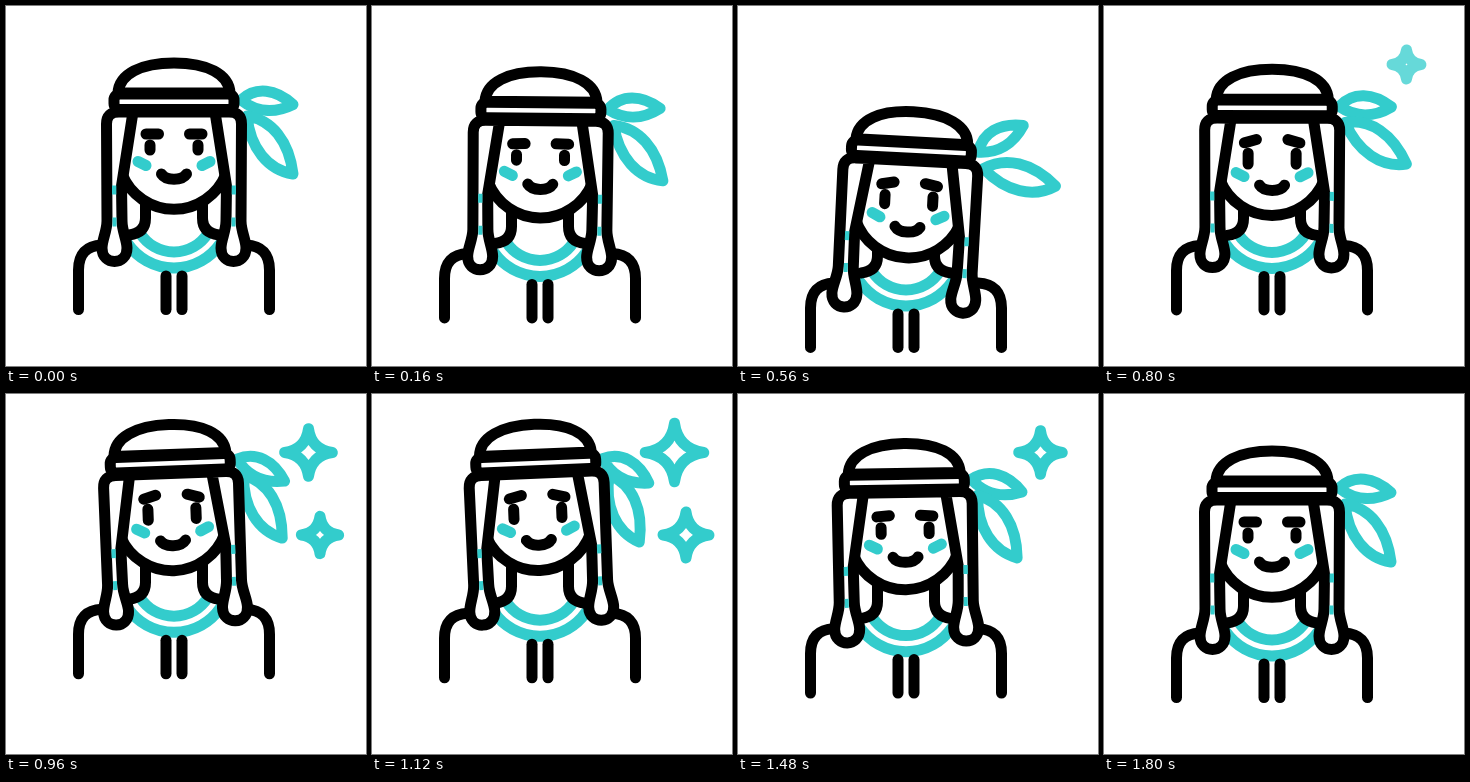
An HTML page for the animation above (2 s loop, 360x360 px).

```html
<!DOCTYPE html>
<html lang="en">
<head>
<meta charset="utf-8">
<title>Nodding character</title>
<style>
  html, body { margin: 0; width: 100%; height: 100%; overflow: hidden; background: #fff; }
  svg { display: block; width: 100vw; height: 100vh; }
  .ink, .teal { fill: none; stroke-width: 11; stroke-linecap: round; stroke-linejoin: round; }
  .ink { stroke: #000; }
  .teal { stroke: #3cc; }
  .solid { fill: #fff; }
  .tie { stroke-width: 9; stroke-linecap: butt; }
</style>
</head>
<body>
<svg viewBox="0 0 360 360">
  <defs>
    <g id="shoulder" class="ink">
      <path d="M72.5 303.5V264Q72.5 240 96 239"/>
      <path d="M139.5 190V212Q139.5 227 123 229"/>
      <path d="M160 303.5V270"/>
    </g>
    <g id="braid">
      <path class="ink solid" d="M127 106L115.5 180L116 215C116 225 121 234 121 242C121 260 96 260 96 242C96 234 101 225 101 215L100.5 118Q100.5 106 113 106Z"/>
      <path class="teal tie" d="M106 184H110.3M106.500 216H110.500"/>
    </g>
  </defs>

  <g id="body">
    <g class="teal">
      <path d="M134.6 228A40 40 0 0 0 201.4 228"/>
      <path d="M122 238A56 56 0 0 0 214 238"/>
    </g>
    <use href="#shoulder"/>
    <use href="#shoulder" transform="matrix(-1 0 0 1 336 0)"/>
  </g>

  <g id="head">
    <path id="feather1" class="teal" d="M235 94C250 80 270 83 287 98.500C268 108 250 106 235 94Z"/>
    <path id="feather2" class="teal" d="M241 110C266 114 283 135 287 168C262 164 244 142 241 110Z"/>
    <path class="ink solid" d="M120 106L116 168A56 56 0 0 0 220 168L216 106Z"/>
    <use href="#braid"/>
    <use href="#braid" transform="matrix(-1 0 0 1 336 0)"/>
    <path class="ink solid" d="M112 87C113 68 135 57 168 57C201 57 223 68 224 87Z"/>
    <rect class="ink solid" x="108" y="88" width="120" height="15.5" rx="6"/>
    <g id="face">
      <path class="teal" d="M132 155.5L140 159.5M204 155.5L196 159.5"/>
      <path class="ink" d="M155.5 168C160 175 176 175 180.5 168"/>
      <path class="ink" id="eyes"/>
      <path class="ink" id="browL" d="M140 128H152.500"/>
      <path class="ink" id="browR" d="M183.500 128H196"/>
    </g>
  </g>

  <path id="star1" class="teal"/>
  <path id="star2" class="teal"/>
</svg>
<script>
  const LOOP = 2000, STEP = 40, REST = 1800, DOWN = 520, RISE = 500;
  const $ = id => document.getElementById(id);
  const move = (id, value) => $(id).setAttribute("transform", value);
  const clamp = u => Math.max(0, Math.min(1, u));

  const sine = u => (1 - Math.cos(Math.PI * u)) / 2;
  const easeOut = u => 1 - (1 - u) ** 2;

  // Rest, then the low pose, then the high pose, then back to rest.
  function swing(t, low, high, lag, settle = sine) {
    const dip = lag + DOWN, top = dip + RISE;
    if (t < dip) return low * sine(clamp((t - lag) / DOWN));
    if (t < top) return low + (high - low) * sine((t - dip) / RISE);
    return high * (1 - settle((t - top) / (REST - top)));
  }

  function drawStar(id, x, y, from, to, peak, t) {
    const u = clamp((t - from) / (to - from));
    const r = 9 + (peak - 9) * Math.sin(Math.PI * u), c = r * 0.12;
    $(id).setAttribute("d", `M0 ${-r}Q${c} ${-c} ${r} 0Q${c} ${c} 0 ${r}Q${-c} ${c} ${-r} 0Q${-c} ${-c} 0 ${-r}Z`);
    $(id).setAttribute("opacity", clamp(Math.min(t - from, to - t) / 107));
    move(id, `translate(${x} ${y})`);
  }

  function draw(t) {
    const body = swing(t, 39, -26, 0, easeOut);
    const drop = swing(t, 11, -7, 100);
    move("body", `translate(0 ${body})`);
    move("head", `translate(0 ${body + drop}) rotate(${swing(t, 3, -2.4, 20)} 168 200)`);
    move("feather1", `rotate(${swing(t, -39, 26, 20)} 235 94)`);
    move("feather2", `rotate(${swing(t, -41, 17, 60)} 241 110)`);

    const look = Math.sin(Math.PI * t / REST), mood = look ** 2;
    const lift = `translate(0 ${-4 * mood})`;
    move("face", `translate(0 ${5 * look})`);
    move("browL", `${lift} rotate(${-16 * mood} 146 128)`);
    move("browR", `${lift} rotate(${16 * mood} 190 128)`);
    const eye = 2.5 + 3 * mood, span = `${141.5 - eye}v${2 * eye}`;
    $("eyes").setAttribute("d", `M144 ${span}M192 ${span}`);

    drawStar("star1", 302.5, 58.5, 720, 1680, 30, t);
    drawStar("star2", 314, 141, 800, 1460, 23, t);
  }

  const start = performance.now();
  function tick() {
    const t = (performance.now() - start) % LOOP;
    draw(Math.min(REST, Math.floor(t / STEP) * STEP));
    requestAnimationFrame(tick);
  }
  tick();
</script>
</body>
</html>
```
